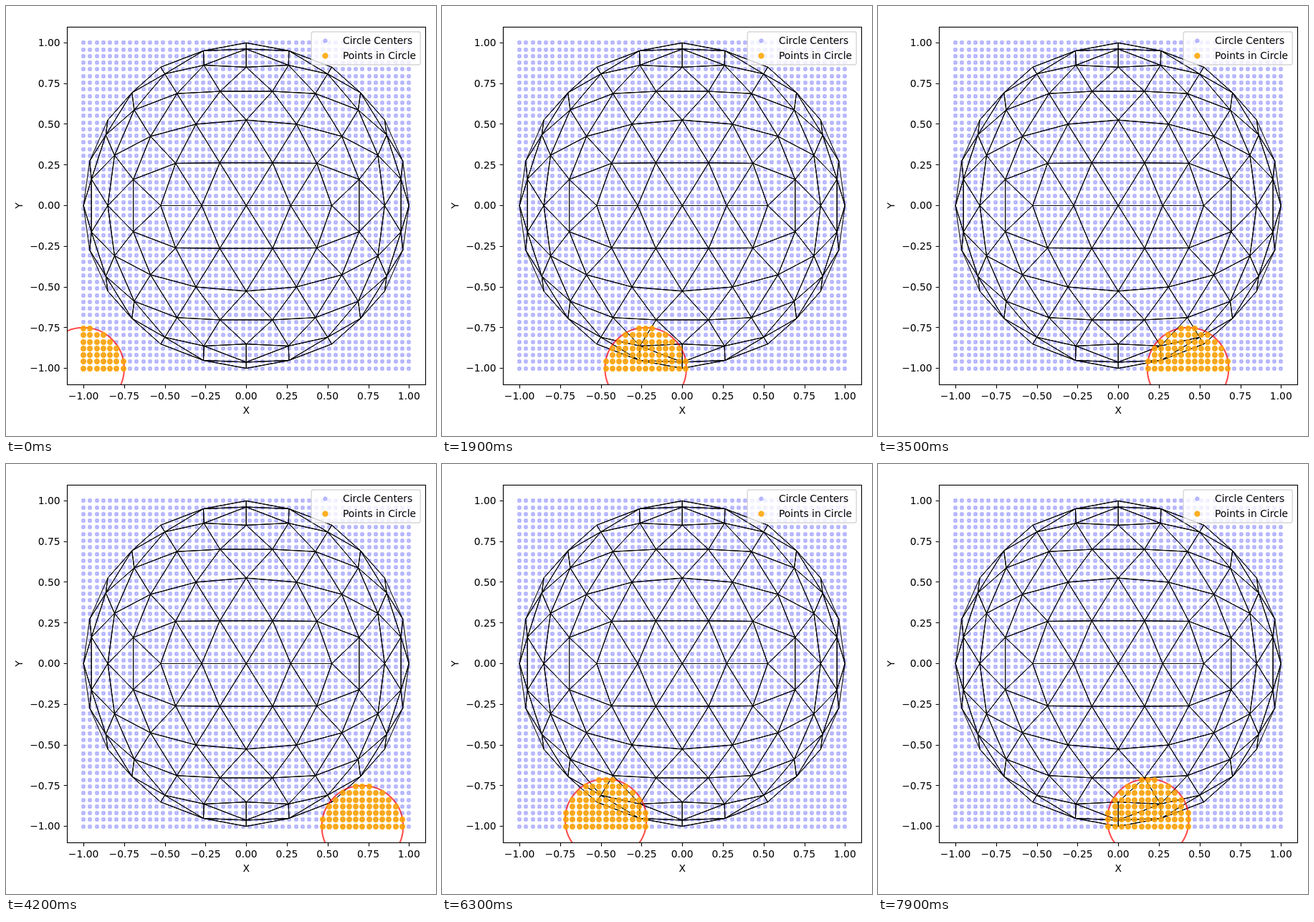
Animation, 600 px wide and 600 px high, one loop 8 s. Source, as an HTML page:

```html
<!DOCTYPE html>
<html lang="en">
<head>
<meta charset="utf-8">
<title>Sliding circle over a point grid</title>
<style>
  html, body { margin: 0; width: 100%; height: 100%; overflow: hidden; background: #fff; }
  svg { display: block; width: 600px; height: 600px; }
  text { font: 13.89px "DejaVu Sans", sans-serif; fill: #000; }
  .center { fill: #00f; stroke: #00f; stroke-width: 2.08; fill-opacity: .2; stroke-opacity: .2; }
  .hit { fill: orange; stroke: orange; stroke-width: 2.08; fill-opacity: .8; stroke-opacity: .8; }
  .mesh { fill: none; stroke: #000; stroke-width: .69; stroke-linejoin: round; }
  .ring { fill: none; stroke: red; stroke-width: 2.08; stroke-opacity: .7; }
  .axis { fill: none; stroke: #000; stroke-width: 1.11; }
  .legend { fill: #fff; fill-opacity: .8; stroke: #ccc; stroke-opacity: .8; stroke-width: 1.39; }
  .mid { text-anchor: middle; }
  .end { text-anchor: end; }
</style>
</head>
<body>
<svg viewBox="0 0 600 600">
  <clipPath id="plot"><rect x="85.4" y="28.7" width="499.6" height="499.6"/></clipPath>
  <g clip-path="url(#plot)">
    <g id="grid"></g>
    <g id="mesh"></g>
    <circle id="ring" class="ring"/>
    <g id="hits"></g>
  </g>
  <g id="axes"></g>
  <text class="mid" x="335.2" y="569">X</text>
  <text class="mid" transform="translate(23 278.5) rotate(-90)">Y</text>
  <rect class="legend" x="426.2" y="36" width="152" height="46" rx="2.8"/>
  <circle class="center" cx="445.5" cy="48.5" r="2.2"/>
  <circle class="hit" cx="445.5" cy="69.5" r="3.1"/>
  <text x="470" y="52.5">Circle Centers</text>
  <text x="470" y="73.5">Points in Circle</text>
</svg>
<script>
const N = 50, STEP = 2 / (N - 1), RADIUS = 0.25, SCALE = 227.1;
const FRAME = 100, FRAMES = 80;
const px = x => 335.2 + x * SCALE;
const py = y => 278.5 - y * SCALE;
const coord = i => -1 + i * STEP;
const el = id => document.getElementById(id);

// Markers sit on whole pixels
const dot = (cls, i, j, r) =>
  `<circle class="${cls}" cx="${Math.round(px(coord(i)))}" cy="${Math.round(py(coord(j)))}" r="${r}"/>`;

function drawGrid() {
  let out = '';
  for (let j = 0; j < N; j++)
    for (let i = 0; i < N; i++) out += dot('center', i, j, 2.2);
  el('grid').innerHTML = out;
}

// Icosahedron subdivided twice, projected along z
function drawMesh() {
  const unit = v => v.map(c => c / Math.hypot(...v));
  const mid = (p, q) => unit(p.map((c, i) => c + q[i]));
  const dist = (p, q) => Math.hypot(...p.map((c, i) => c - q[i]));
  const phi = (1 + Math.sqrt(5)) / 2;
  const verts = [];
  for (const s of [-1, 1])
    for (const t of [-phi, phi])
      verts.push(unit([s, 0, t]), unit([t, s, 0]), unit([0, t, s]));

  const near = (p, q) => dist(p, q) < 1.1;
  let faces = [];
  verts.forEach((a, i) => verts.forEach((b, j) => verts.forEach((c, k) => {
    if (i < j && j < k && near(a, b) && near(b, c) && near(a, c)) faces.push([a, b, c]);
  })));
  for (let n = 0; n < 2; n++)
    faces = faces.flatMap(([a, b, c]) => {
      const ab = mid(a, b), bc = mid(b, c), ca = mid(c, a);
      return [[a, ab, ca], [b, bc, ab], [c, ca, bc], [ab, bc, ca]];
    });

  el('mesh').innerHTML = faces.map(f => {
    const points = f.map(([x, y]) => px(x).toFixed(2) + ',' + py(y).toFixed(2)).join(' ');
    return `<polygon class="mesh" points="${points}"/>`;
  }).join('');
}

function drawAxes() {
  let out = '<rect class="axis" x="85.5" y="29.5" width="500" height="499"/>';
  for (let n = -4; n <= 4; n++) {
    const v = n / 4;
    const label = (v < 0 ? '\u2212' : '') + Math.abs(v).toFixed(2);
    const x = Math.round(px(v)) + 0.5, y = Math.floor(py(v)) + 0.5;
    out += `<path class="axis" d="M${x} 528.5V533.4M85.5 ${y}H80.6"/>` +
      `<text class="mid" x="${px(v)}" y="549">${label}</text>` +
      `<text class="end" x="75.7" y="${Math.round(py(v) + 4.8)}">${label}</text>`;
  }
  el('axes').innerHTML = out;
}

function drawCircle(k) {
  const ci = k % N, cj = Math.floor(k / N);
  const ring = el('ring');
  ring.setAttribute('cx', px(coord(ci)));
  ring.setAttribute('cy', py(coord(cj)));
  ring.setAttribute('r', RADIUS * SCALE);

  let out = '';
  for (let j = 0; j < N; j++)
    for (let i = 0; i < N; i++)
      if (Math.hypot(i - ci, j - cj) * STEP <= RADIUS) out += dot('hit', i, j, 3.1);
  el('hits').innerHTML = out;
}

drawGrid();
drawMesh();
drawAxes();

let shown = -1;
const start = performance.now();
function tick() {
  const k = Math.floor((performance.now() - start) / FRAME) % FRAMES;
  if (k !== shown) drawCircle(shown = k);
  requestAnimationFrame(tick);
}
tick();
</script>
</body>
</html>
```
